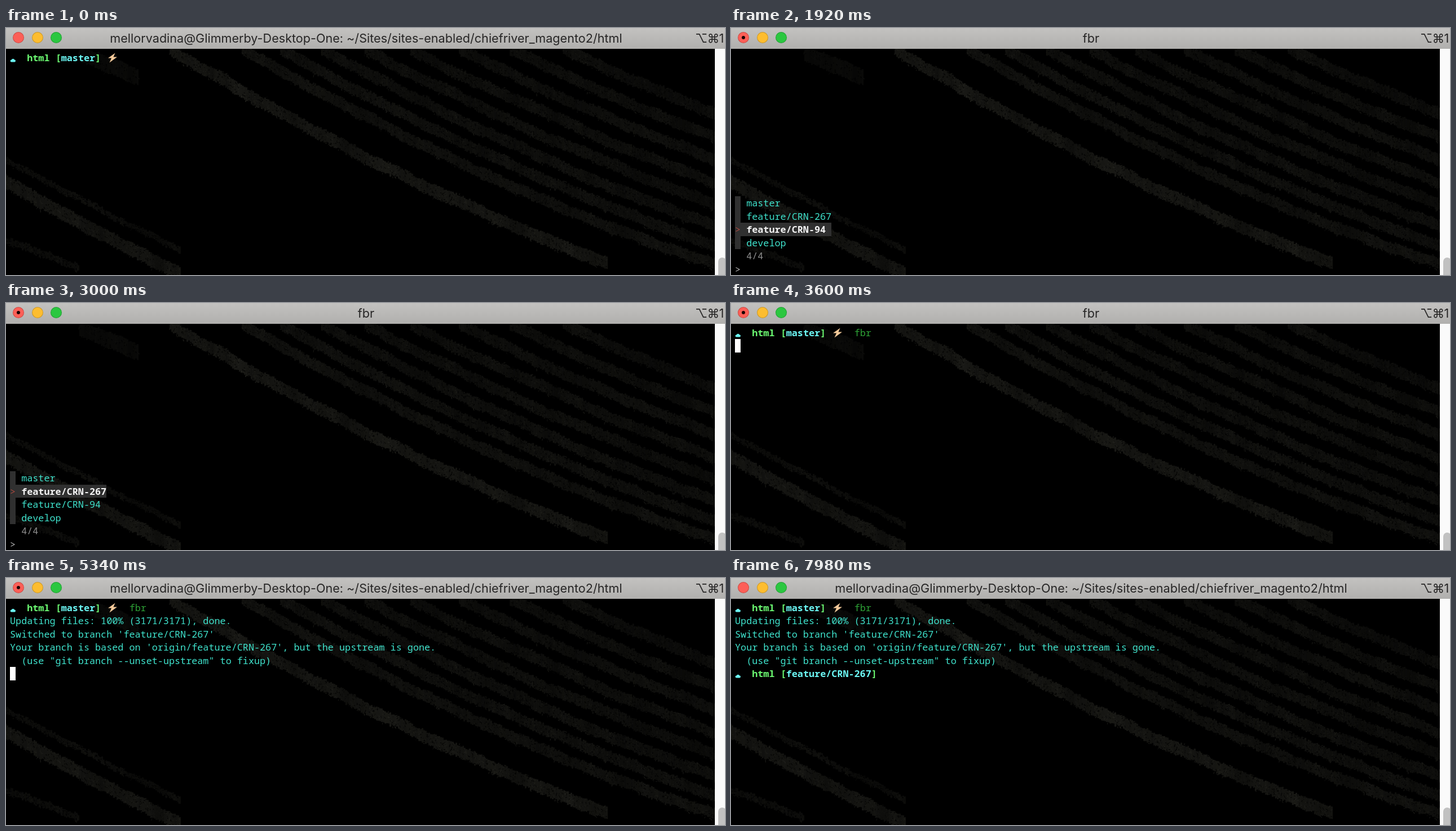
Write an HTML page with a canvas that moves like this. It is 1275 by 439 pixels and loops after 8 s.

```html
<!DOCTYPE html>
<html lang="en">
<head>
<meta charset="utf-8">
<title>Terminal</title>
<style>
html, body { margin: 0; width: 100%; height: 100%; overflow: hidden; background: #000; }
#stage { position: absolute; left: 0; top: 0; width: 1275px; height: 439px; overflow: hidden; }
#stage * { position: absolute; }
#bar { left: 0; top: 0; width: 1275px; height: 37px; background: linear-gradient(#c3c2c0, #b0afad); }
.light { top: 7px; width: 20px; height: 20px; border-radius: 50%; box-shadow: inset 0 0 0 1px #0003; }
#dot { left: 7px; top: 7px; width: 6px; height: 6px; border-radius: 50%; background: #190000; }
#title, #keys { top: 0; color: #262525; white-space: pre; font: 21.6px/36px Inter, Roboto, sans-serif; }
#title { left: 0; width: 1277px; text-align: center; }
#keys { left: 1222px; letter-spacing: -.03em; }
#track { left: 1256.5px; top: 37px; width: 19px; height: 402px; background: #fafafa; }
#thumb { left: 6px; top: 371px; width: 14px; height: 40px; border-radius: 7px; background: #c1c1c1; }
.t { white-space: pre; font: 16.8px/23.5px "Noto Sans Mono", "DejaVu Sans Mono", monospace; font-variant-ligatures: none; }
.b { font-weight: 700; }
</style>
</head>
<body>
<div id="stage">
  <canvas id="rock" width="1275" height="439"></canvas>
  <div id="screen"></div>
  <div id="track"><div id="thumb"></div></div>
  <div id="bar">
    <div class="light" style="left:12px;background:#fc5f57"><div id="dot"></div></div>
    <div class="light" style="left:45.5px;background:#fdbd30"></div>
    <div class="light" style="left:79px;background:#2bc740"></div>
    <div id="title"></div>
    <div id="keys">⌥⌘1</div>
  </div>
</div>
<script>
const LOOP = 8000, COL = 10.08, ROW = 23.53, LEFT = 7, TOP = 40.5;
const AQUA = '#3fe3cd', LIME = '#6cfb72', CYAN = '#6cf8f5', GREEN = '#2ea336';
const HOME = 'mellorvadina@Glimmerby-Desktop-One: ~/Sites/sites-enabled/chiefriver_magento2/html';
const $ = id => document.getElementById(id);

// ---- rock layers behind the text
function paintRock(ctx) {
  let seed = 7;
  const rnd = () => (seed = (seed * 16807) % 2147483647) / 2147483647;
  const gray = v => `rgb(${v | 0},${v | 0},${v * .86 | 0})`;

  // one layer: a ragged strip along a falling, slowly flattening curve
  function layer(x0, y0, slope, half, tone, end = 1257) {
    let wob = 0, shade = 1;
    for (let x = x0; x < end; x += 3) {
      const d = x - x0, y = y0 + slope * d - .00014 * d * d;
      wob = wob * .9 + (rnd() - .5) * 2;
      shade = shade * .8 + (.5 + rnd()) * .2;
      const h = half + (rnd() - .5) * 4;
      ctx.fillStyle = gray(tone * .62 * shade);
      ctx.fillRect(x, y + wob - h, 3, h * 2);
      for (let k = 0; k < 5; k++) {
        const gy = y + wob + (rnd() * 2 - 1) * half * 1.15, s = 2 + rnd() * 6;
        ctx.strokeStyle = gray(rnd() < .5 ? tone * .2 : tone * .9 * shade);
        ctx.lineWidth = .6 + rnd();
        ctx.beginPath();
        ctx.moveTo(x, gy);
        ctx.lineTo(x + s * (rnd() - .3), gy + s * (rnd() - .3));
        ctx.stroke();
      }
    }
  }

  ctx.fillRect(0, 0, 1275, 439);
  for (let i = 7; i >= 0; i--) {
    const x0 = 418 + 66 * i + 2.2 * i * i;
    layer(x0, 38, .6 - (x0 - 290) * .0002, 10, 25 - i * .6);
  }
  layer(290, 38, .6, 11, 31, 1065);
  layer(-5, 272, .57, 12, 30, 310);
  layer(-5, 232, .56, 5, 19, 310);
  layer(-5, 375, .4, 6, 19, 130);
  layer(130, 45, .4, 14, 14, 235);
}

// ---- screen parts
const at = (col, row) => `left:${LEFT + col * COL}px;top:${TOP + row * ROW}px;`;
const text = (col, row, str, color, bold) =>
  `<span class="t${bold ? ' b' : ''}" style="${at(col, row)}color:${color}">${str}</span>`;
const block = (col, row, cols, rows, color) =>
  `<div style="${at(col, row)}width:${cols * COL}px;height:${rows * ROW}px;background:${color}"></div>`;
const shape = (col, row, path, color) =>
  `<svg width="24" height="24" style="${at(col, row)}"><path d="${path}" fill="${color}"/></svg>`;

const CLOUD = 'M2.5 19.5a2 2 0 0 1 .3-4 2.8 2.8 0 0 1 5-.3 2.2 2.2 0 0 1 .7 4.3z';
const BOLT = 'M13.5 3.5L1 12.5h6L3.5 20.500 17 10.5h-6.5z';

const prompt = (row, branch) =>
  shape(0, row, CLOUD, CYAN) + text(3, row, 'html', LIME, 1) + text(8, row, '[', LIME, 1) +
  text(9, row, branch, CYAN, 1) + text(9 + branch.length, row, ']', LIME, 1);

const ITEMS = ['master', 'feature/CRN-267', 'feature/CRN-94', 'develop'];

function picker(pick) {
  return block(0, 11, 1, 4, '#303030') + block(1, 11 + pick, 16, 1, '#303030') +
    ITEMS.map((s, i) => text(2, 11 + i, s, i === pick ? '#f4f4f4' : AQUA, i === pick)).join('') +
    text(0, 11 + pick, '&gt;', '#a9483f') + text(2, 15, '4/4', '#8f8f8f') + text(0, 16, '&gt;', '#b4b4b4');
}

// ---- timeline
const ENTER = 960, LIST = 1500, CHOSEN = 3480, COUNT = 3960, DONE = 4440, READY = 5700;
const KEY = 180, MOVE = 330, BLINK = 520, TOTAL = 3171;

function screenAt(t) {
  if (t >= LIST && t < CHOSEN) return picker(Math.max(1, 3 - Math.floor((t - LIST) / MOVE)));

  const typed = 'fbr'.slice(0, Math.max(0, Math.floor((t - 120) / KEY)));
  let out = prompt(0, 'master') + shape(17.2, 0, BOLT, '#f3c99a') + text(21, 0, typed, GREEN);
  let cursor = t < ENTER ? [21 + typed.length, 0] : [0, 1];

  if (t >= COUNT) {
    const part = Math.min(1, .6 + .4 * (t - COUNT) / (DONE - COUNT));
    const pct = String(Math.floor(part * 100)).padStart(3);
    const line = `Updating files: ${pct}% (${Math.floor(part * TOTAL)}/${TOTAL})`;
    out += text(0, 1, line + (t >= DONE ? ', done.' : ''), AQUA);
    cursor = [line.length, 1];
  }
  if (t >= DONE) {
    out += text(0, 2, "Switched to branch 'feature/CRN-267'", AQUA) +
      text(0, 3, "Your branch is based on 'origin/feature/CRN-267', but the upstream is gone.", AQUA) +
      text(2, 4, '(use "git branch --unset-upstream" to fixup)', AQUA);
    cursor = [0, 5];
  }
  if (t >= READY) {
    out += prompt(5, 'feature/CRN-267');
    cursor = [26, 5];
  }
  const lit = (t + 900) % (2 * BLINK) < BLINK;
  return out + (lit ? block(...cursor, 1, 1, '#fff') : '');
}

let shown = '';
function draw(t) {
  const html = screenAt(t);
  if (html !== shown) $('screen').innerHTML = shown = html;
  $('title').textContent = t >= ENTER && t < DONE ? 'fbr' : HOME;
  $('dot').hidden = t < LIST || t >= READY;
}

paintRock($('rock').getContext('2d'));
const start = performance.now();
function tick() {
  draw((performance.now() - start) % LOOP);
  requestAnimationFrame(tick);
}
tick();
</script>
</body>
</html>
```
